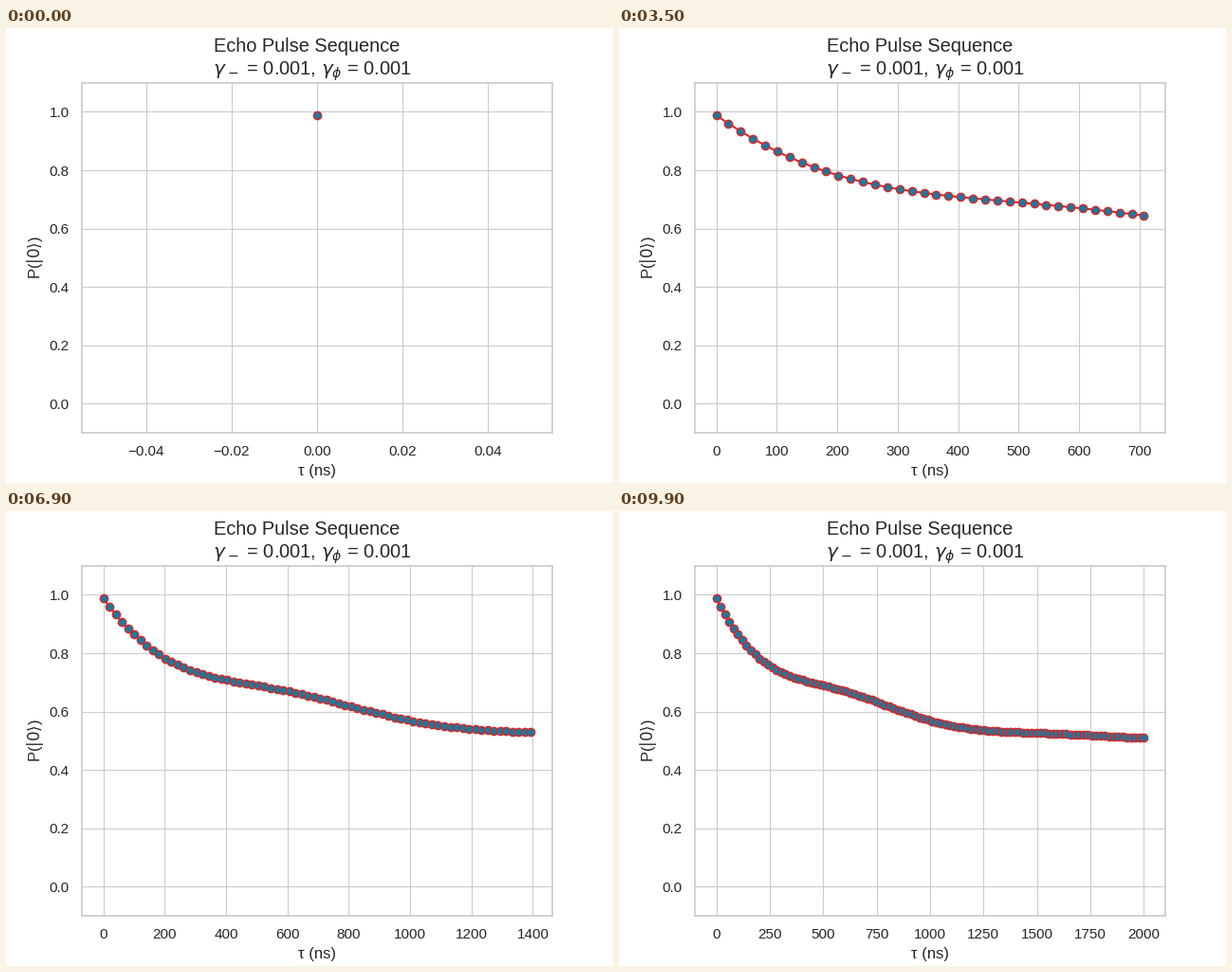
Write a matplotlib script that moves like this. It is 640 px wide and 480 px high and loops after 10 s.

```python
import numpy as np
import matplotlib.pyplot as plt
from matplotlib.animation import FuncAnimation

N = 100
DARK, LIGHT = "0.15", "0.8"

plt.rcParams.update({
    "font.family": ["Liberation Sans", "DejaVu Sans"],
    "font.size": 12,
    "axes.labelsize": 12,
    "xtick.labelsize": 11,
    "ytick.labelsize": 11,
    "text.color": DARK,
    "axes.labelcolor": DARK,
    "xtick.color": DARK,
    "ytick.color": DARK,
    "axes.edgecolor": LIGHT,
    "axes.linewidth": 1.25,
    "axes.grid": True,
    "axes.axisbelow": True,
    "grid.color": LIGHT,
    "grid.linewidth": 0.8,
    "xtick.bottom": False,
    "ytick.left": False,
    "xtick.major.size": 6,
    "ytick.major.size": 6,
})


def echo(t):
    """Exponential decay towards 1/2 with a slow ripple."""
    ripple = 0.992 - 0.159 * np.sin(0.00626 * t + 0.1)
    return 0.5 + 0.5 * np.exp(-0.00195 * t) * ripple


tau = np.linspace(0, 2000, N)
prob = echo(tau)

fig, ax = plt.subplots(figsize=(6.4, 4.8), dpi=100)
fig.suptitle("Echo Pulse Sequence \n"
             r" $\gamma_-$ = 0.001, $\gamma_\phi$ = 0.001",
             fontsize=14.4, linespacing=1.32)
ax.set_xlabel("τ (ns)")
ax.set_ylabel(r"P($|0\rangle$)", labelpad=2.5)
ax.set_ylim(-0.1, 1.1)
line, = ax.plot([], [], "o-", color="tab:red", markerfacecolor="#1f779c",
                lw=1.5, ms=6, mew=1)


def update(i):
    line.set_data(tau[:i + 1], prob[:i + 1])
    ax.relim()
    ax.autoscale(axis="x")
    ax.autoscale_view(scaley=False)
    return line,


anim = FuncAnimation(fig, update, frames=N, interval=100,
                     init_func=lambda: update(0), repeat=True, repeat_delay=0)
plt.show()
```
